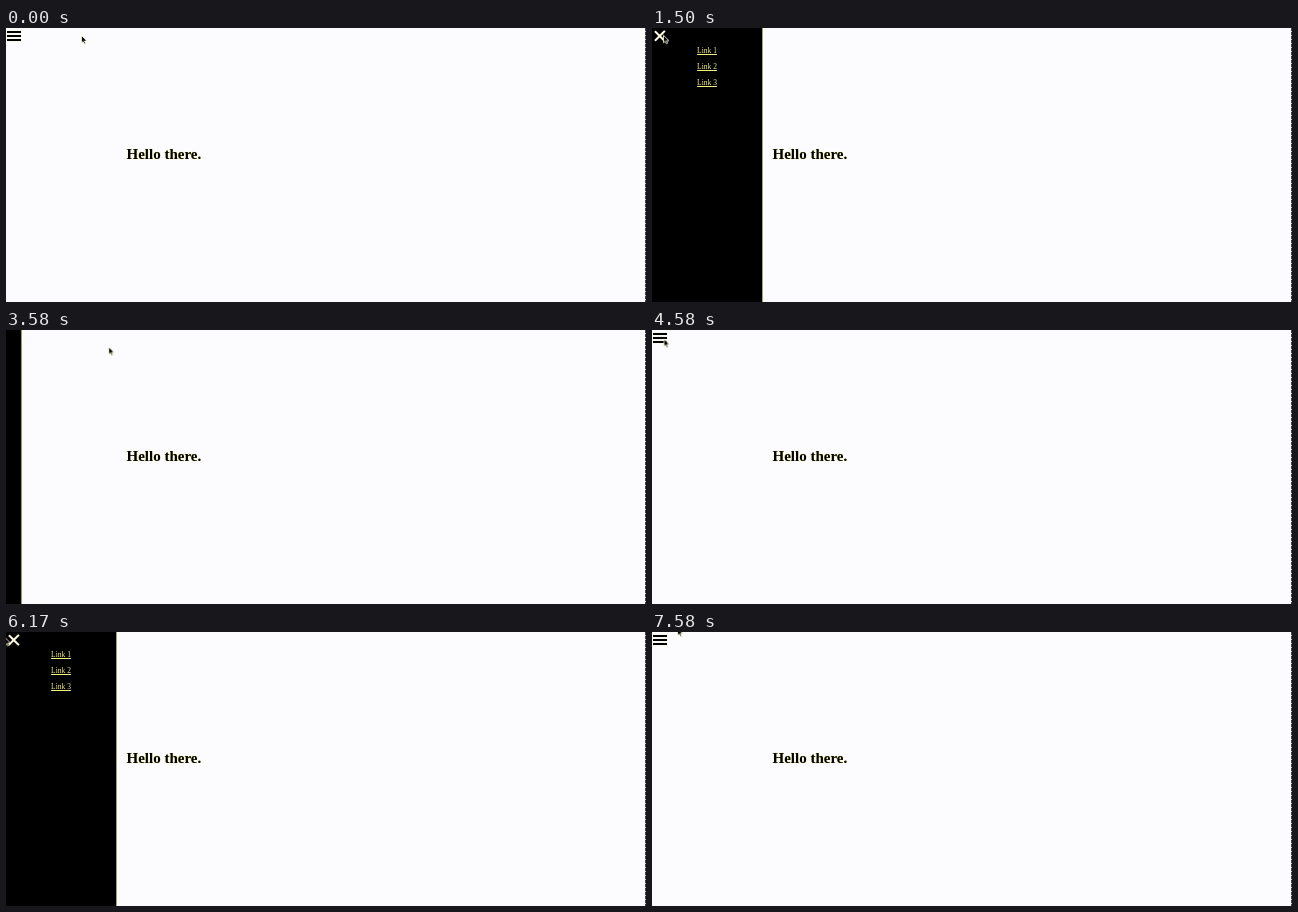
An HTML page for the animation above (7910 ms loop, 640 by 274 pixels).

```html
<!DOCTYPE html>
<html lang="en">
<head>
<meta charset="utf-8">
<title>Sliding menu</title>
<style>
  html, body { margin: 0; width: 100%; height: 100%; overflow: hidden; background: #fcfcfe; }
  body { position: relative; font-family: "Liberation Serif", "Times New Roman", serif; }
  h1, nav, a, .icon, .bar, .edge, .cursor { position: absolute; margin: 0; }
  h1 {
    left: 120.5px; top: 117px; font-size: 15px; line-height: 18px; white-space: nowrap;
    color: #000; text-shadow: 0 0 1px #d6d640;
  }
  .edge {
    left: 639px; top: 0; width: 1px; height: 274px;
    background: repeating-linear-gradient(#444 0 3px, #ccc 3px 4px);
  }
  nav {
    left: 0; top: 0; width: 110px; height: 274px;
    background: #000; border-right: 1px solid #a3a36c;
  }
  a {
    left: 0; width: 110px; text-align: center; font-size: 7.5px; line-height: 10px;
    color: #f2f27c; text-decoration: underline;
  }
  .icon { left: 1.25px; top: 7px; }
  .bar { left: 0; top: 0; width: 13.5px; height: 2px; }
  .cursor { left: 0; top: 0; width: 7px; height: 10px; overflow: visible; }
</style>
</head>
<body>
<h1>Hello there.</h1>
<div class="edge"></div>
<nav>
  <a style="top:18px">Link 1</a>
  <a style="top:34px">Link 2</a>
  <a style="top:50px">Link 3</a>
</nav>
<div class="icon">
  <div class="bar"></div>
  <div class="bar"></div>
  <div class="bar"></div>
</div>
<svg class="cursor" viewBox="0 0 7 10">
  <path d="M.5 .5V8L2.2 6.5 3.3 9 4.6 8.4 3.5 6H5.8Z" stroke="#fffee0" stroke-width=".8"/>
</svg>
<script>
const LOOP = 7910;
const STEPS = 95;
const STEP = LOOP / STEPS;

// Each visit opens the menu, blanks the cross on click, then slides shut.
const visits = [
  { open: 887, click: 3150, close: 3300 },
  { open: 4970, click: 6730, close: 6890 },
];
const SLIDE = 500;
const PHASE = 300;
const UNCOVERED = 350;

const animations = [];

// rows: [time, style, easing towards the next row]
function play(element, rows) {
  const frames = rows.map(([time, style, easing = 'linear']) =>
    ({ ...style, easing, offset: time / LOOP }));
  frames.unshift({ ...frames[0], easing: 'linear', offset: 0 });
  frames.push({ ...frames[frames.length - 1], offset: 1 });
  const animation = element.animate(frames, { duration: LOOP, fill: 'both' });
  animation.pause();
  animations.push(animation);
}

const shift = x => ({ transform: `translateX(${x}px)` });
play(document.querySelector('nav'), visits.flatMap(({ open, close }) => [
  [open, shift(-111), 'ease'],
  [open + SLIDE, shift(0)],
  [close, shift(0), 'ease'],
  [close + SLIDE, shift(-111)],
]));

const paint = (color, glow) => ({
  backgroundColor: color,
  boxShadow: `0 0 1px ${glow ? '#c8c83c' : 'transparent'}`,
});
const dark = paint('#000', true);
const hidden = paint('#000', false);
const light = paint('#fffee0', false);

const pose = (y, angle, opacity = 1) =>
  ({ transform: `translateY(${y}px) rotate(${angle}deg)`, opacity });

document.querySelectorAll('.bar').forEach((bar, i) => {
  const side = i - 1;
  const apart = pose(side * 4, 0);
  const joined = pose(0, 0, side ? 1 : 0);
  const crossed = pose(0, -side * 45, side ? 1 : 0);

  play(bar, visits.flatMap(({ open, close }) => [
    [open, apart, 'ease'],
    [open + PHASE, joined, 'ease'],
    [open + 2 * PHASE, crossed],
    [close, crossed, 'ease'],
    [close + PHASE, joined, 'ease'],
    [close + 2 * PHASE, apart],
  ]));

  play(bar, [
    [0, dark, 'step-end'],
    ...visits.flatMap(({ open, click, close }) => [
      [open, light, 'step-end'],
      [click, hidden, 'step-end'],
      [close + UNCOVERED, dark, 'step-end'],
    ]),
  ]);
});

// Pointer stops: [step, x, y, easing]
const pointer = [
  [0, 75, 7, 'ease-in-out'],
  [10, 11, 7],
  [21, 11, 6.5],
  [22, 60, 30],
  [23, 140, 47],
  [24, 210, 42],
  [25, 235, 28],
  [27, 235, 28, 'ease-in-out'],
  [36, 9.5, 6.8],
  [39, 9.5, 6.8, 'ease-in-out'],
  [47, 195, 26],
  [49, 191, 28],
  [50, 191, 28, 'ease-in-out'],
  [55, 11.5, 8.5],
  [57, 11, 7],
  [59, 11, 7, 'ease-in'],
  [64, 83, 34.8, 'ease-out'],
  [69, 149, 38.5],
  [70, 147, 38],
  [71, 147, 38, 'ease-in-out'],
  [74, -1.5, 5],
  [76, -1.5, 5],
  [79, 6, 7],
  [82, 6, 7, 'ease-in-out'],
  [91, 25, -4.5],
];
play(document.querySelector('.cursor'), pointer.map(([step, x, y, easing]) =>
  [step * STEP, { transform: `translate(${x}px, ${y}px)` }, easing]));

const start = performance.now();
function render() {
  const elapsed = (performance.now() - start) % LOOP;
  const step = Math.floor((elapsed + 4) / STEP) % STEPS;
  for (const animation of animations) animation.currentTime = step * STEP;
  requestAnimationFrame(render);
}
render();
</script>
</body>
</html>
```
